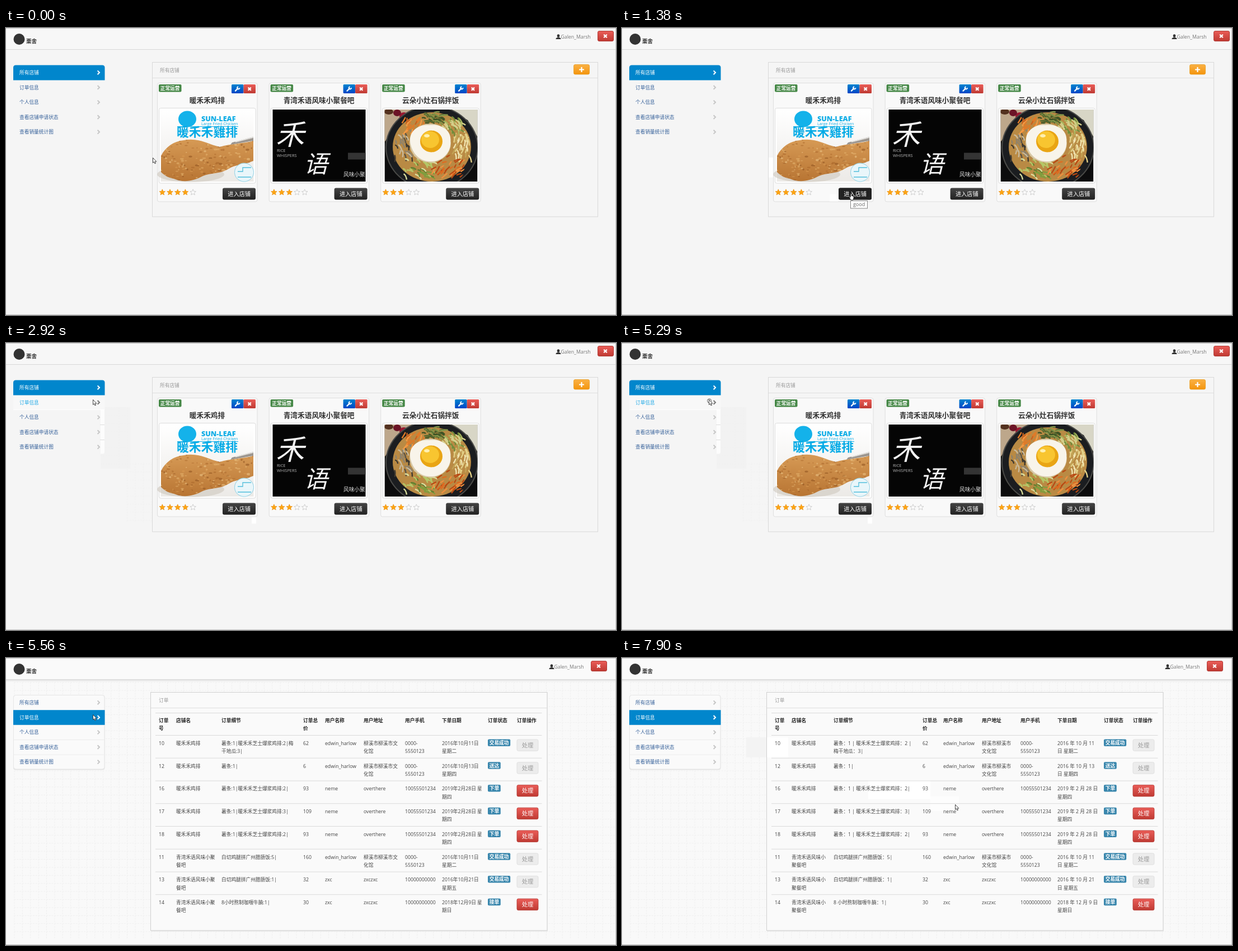
Animation of 1090x514 px, one loop 8000 ms. Source, as an HTML page:

```html
<!DOCTYPE html>
<html lang="zh-CN">
<head>
<meta charset="utf-8">
<title>店铺管理</title>
<style>
html, body { margin: 0; width: 100%; height: 100%; overflow: hidden; background: #f5f5f5; }
svg { display: block; width: 100%; height: 100%; }
text { font-family: "Open Sans", "Noto Sans CJK SC", "Noto Sans CJK", "Noto Sans CJK JP", sans-serif; font-size: 8.7px; white-space: pre; }
</style>
</head>
<body>
<svg id="stage" viewBox="0 0 1090 514" preserveAspectRatio="none"></svg>
<script>
const stage = document.getElementById('stage');
let seed = 7;
const rnd = () => (seed = seed * 16807 % 2147483647) / 2147483647;
const times = (n, f) => Array.from({ length: n }, (_, i) => f(i)).join('');

// Drawing helpers
const rect = (x, y, w, h, fill, more = '') =>
  `<rect x="${x}" y="${y}" width="${w}" height="${h}" fill="${fill}" ${more}/>`;
const text = (x, y, s, fill, more = '') => `<text x="${x}" y="${y}" fill="${fill}" ${more}>${s}</text>`;
const path = (d, fill, more = '') => `<path d="${d}" fill="${fill}" ${more}/>`;
const line = (x1, y1, x2, y2, c, w = 1) =>
  `<path d="M${x1} ${y1}L${x2} ${y2}" stroke="${c}" stroke-width="${w}" fill="none"/>`;
const ellipse = (x, y, rx, ry, fill, more = '') =>
  `<ellipse cx="${x}" cy="${y}" rx="${rx}" ry="${ry}" fill="${fill}" ${more}/>`;
const group = (body, more = '') => `<g ${more}>${body}</g>`;
const at = (x, y, body) => group(body, `transform="translate(${x} ${y})"`);
const show = (from, to, body) => group(body, `data-from="${from}" data-to="${to}"`);
const grad = (id, a, b) => `<linearGradient id="${id}" x2="0" y2="1"><stop stop-color="${a}"/><stop offset="1" stop-color="${b}"/></linearGradient>`;
const bold = 'font-weight="700"';
const mid = 'text-anchor="middle"';

const cross = (x, y, r = 2.8) =>
  path(`M${x - r} ${y - r}l${2 * r} ${2 * r}m0 ${-2 * r}l${-2 * r} ${2 * r}`, 'none', 'stroke="#fff" stroke-width="2.3"');
const chevron = (y, c) => path(`M163.6 ${y - 3.4}l3.4 3.4l-3.4 3.4`, 'none', `stroke="${c}" stroke-width="2"`);
const wrench = (x, y) => at(x, y, path('M-3.6 3.6L1 -1', 'none', 'stroke="#fff" stroke-width="2.2" stroke-linecap="round"') +
  path('M4 -2A2.3 2.3 0 1 1 1.6 -4', 'none', 'stroke="#fff" stroke-width="1.7"'));

function star(x, y, on) {
  const pts = Array.from({ length: 10 }, (_, i) => {
    const r = i % 2 ? 2.5 : 5.6, a = i * Math.PI / 5;
    return `${(x + r * Math.sin(a)).toFixed(1)},${(y + .4 - r * Math.cos(a)).toFixed(1)}`;
  });
  return `<polygon points="${pts.join(' ')}" fill="${on ? '#fda50f' : '#fafafa'}" stroke="${on ? '#e98f17' : '#bdbdbd'}" stroke-width=".7"/>`;
}

// Shared chrome
function header(shift, bg) {
  return rect(0, 0, 1090, 38, bg) + line(0, 38.5, 1090, 38.5, '#d8d8d8') +
    ellipse(23.5, 20, 10, 10, '#333') + text(36, 27, '栗舍', '#333', 'font-weight="900" style="font-size:9.6px"') +
    at(shift, 0, ellipse(987, 14, 2.3, 2.8, '#333') + path('M982.5 20c0-2.2 1.5-2.5 3.4-3.2h2.2c1.9.7 3.4 1 3.4 3.2z', '#333') +
      text(991.5, 19, 'Galen_Marsh', '#777') +
      rect(1057.5, 5.5, 28, 18, 'url(#red)', 'rx="2.5" stroke="#b23a35"') + cross(1071, 14.5));
}

const menu = ['所有店铺', '订单信息', '个人信息', '查看店铺申请状态', '查看销量统计图'];
const sideItem = (i, on) => {
  const y = 79.8 + i * 26.6;
  return text(24, y + 3.2, menu[i], on ? '#fff' : '#36619a') + chevron(y, on ? '#fff' : '#c6c6c6');
};

// Shop pictures
function chicken() {
  const blob = 'M277 229C285 213 299 203 318 201C345 196 362 209 382 213C400 207 425 207 442 202V238C424 246 410 244 398 252C382 262 366 259 352 265C334 275 316 277 300 270C288 268 281 262 277 258Z';
  const crumbs = times(240, () => {
    const c = ['#e6b56f', '#a9672a', '#d99a50', '#8f531f', '#efc88a'][rnd() * 5 | 0];
    return ellipse((277 + rnd() * 165).toFixed(1), (200 + rnd() * 75).toFixed(1), (1 + rnd() * 2.4).toFixed(1), (.6 + rnd() * 1.4).toFixed(1), c, 'opacity=".55"');
  });
  return rect(276.5, 146, 166, 129, 'url(#plate)') +
    ellipse(330, 262, 60, 14, '#cfc8be', 'opacity=".6"') +
    path(blob, 'url(#crust)') + group(crumbs, 'clip-path="url(#cutlet)"') +
    `<clipPath id="cutlet"><path d="${blob}"/></clipPath>` +
    path('M442 195L404 205L401 209L442 202Z', '#9c9690') + line(410, 204, 442, 196, '#e8e6e2', 1.5) +
    ellipse(324, 163, 16, 14.5, '#14b2ea') +
    text(349, 167, 'SUN-LEAF', '#12aee6', 'font-weight="800" style="font-size:12.6px"') +
    text(349, 173.5, 'Large Fried Chicken', '#12aee6', 'style="font-size:7.2px"') +
    line(306, 176.5, 415, 176.5, '#12aee6', 1) +
    text(305, 193.5, '暖禾禾雞排', '#05abe6', 'font-weight="900" style="font-size:21.8px"') +
    ellipse(425.5, 258.5, 17, 16.5, '#e9f6fa', 'stroke="#8fd0e4"') +
    path('M414 257h9v-7h15M414 267h24', 'none', 'stroke="#52bedb" stroke-width="1.3"');
}

function brushSign() {
  const brush = 'font-weight="500" font-style="italic"';
  return rect(476.5, 146, 166, 129, '#050505') +
    text(482, 209, '禾', '#f4f4f4', `${brush} style="font-size:51px"`) +
    text(532, 259, '语', '#f4f4f4', `${brush} style="font-size:43px"`) +
    text(484, 222, 'RICE', '#b5b5b5', 'style="font-size:7.4px"') +
    text(484, 230.5, 'WHISPERS', '#b5b5b5', 'style="font-size:7.4px"') +
    rect(611, 223.5, 31.5, 12, '#343434') +
    text(603, 265.5, '风味小聚', '#ddd', 'style="font-size:9.7px"');
}

function riceBowl() {
  const heap = (x, y, sx, sy, ang, cols) => times(34, () => {
    const px = x + (rnd() - .5) * sx, py = y + (rnd() - .5) * sy, a = ang + (rnd() - .5) * 1.1, l = 6 + rnd() * 9;
    return path(`M${px.toFixed(1)} ${py.toFixed(1)}q${(l * .4 * Math.cos(a) + 2).toFixed(1)} ${(l * .4 * Math.sin(a) - 2).toFixed(1)} ${(l * Math.cos(a)).toFixed(1)} ${(l * Math.sin(a)).toFixed(1)}`,
      'none', `stroke="${cols[rnd() * cols.length | 0]}" stroke-width="2.4"`);
  });
  return group(rect(676.5, 146, 166, 129, '#0c0c0d') +
    path('M676 146H735L700 170L676 205Z', '#bda78b') + path('M790 146H843V196L825 165Z', '#d8d6c6') +
    ellipse(711, 158, 8, 7, '#9c1730') + ellipse(699, 152, 7, 6, '#6c1426') + ellipse(684, 150, 8, 5, '#53311f') +
    ellipse(761, 214, 82, 74, '#1b1d20', 'stroke="#4a4a47" stroke-width="2"') +
    ellipse(761, 213, 70, 62, '#b98a44') +
    heap(712, 205, 36, 48, 1.2, ['#5d5445', '#8e826c', '#c9b99a', '#403a30']) +
    heap(730, 172, 34, 28, 2.2, ['#e07a28', '#c9601d', '#f09a45']) +
    heap(762, 160, 38, 20, .2, ['#56692f', '#3e5224', '#819348']) +
    heap(797, 172, 36, 28, .8, ['#a9b85f', '#6f8b3a', '#d4cf8a']) +
    heap(814, 208, 28, 42, 1.7, ['#e2cf86', '#c2a355', '#f0e3b0']) +
    heap(735, 250, 54, 34, .6, ['#b4c767', '#809d3d', '#d9dd9d', '#637f30']) +
    heap(793, 246, 54, 36, 2.4, ['#df6b20', '#b94a14', '#f08f3f']) +
    ellipse(758, 206, 37, 35, '#d8c9a6') +
    path('M722 202C721 184 738 172 756 174C778 171 797 184 794 203C796 222 780 239 760 239C738 240 724 222 722 202Z', '#f8f4ea') +
    ellipse(760, 203, 20, 19.5, '#e9a514') + ellipse(758, 200, 16, 15, '#f8c530') +
    ellipse(752, 193, 5, 3, '#fff0b0'), 'clip-path="url(#photo)"');
}

// Shop list page
function card(i, name, stars) {
  return at(i * 199.6, 0,
    rect(270.5, 98.5, 178.5, 212.5, '#f9f9f9', 'rx="3" stroke="#dedede"') +
    rect(273, 101, 40.5, 13.5, '#468847', 'rx="2"') + text(275.7, 111, '正常运营', '#fff', bold) +
    rect(403, 101, 21.5, 16, 'url(#blue)', 'rx="1.5"') + rect(424.5, 101, 21.5, 16, 'url(#red)', 'rx="1.5"') +
    wrench(413.5, 109) + cross(435.2, 109.2, 2.6) +
    text(359.5, 133.6, name, '#333', `${bold} ${mid} style="font-size:12.7px"`) +
    rect(273.5, 143.5, 172.5, 134.5, '#fff', 'rx="3" stroke="#dcdcdc"') +
    times(5, k => star(279.3 + k * 13.7, 294, k < stars)) +
    rect(387, 286.5, 59, 21, 'url(#dark)', 'rx="3"') +
    text(416.7, 300.8, '进入店铺', '#fff', `${mid} style="font-size:10.2px"`));
}

const shops = ['暖禾禾鸡排', '青湾禾语风味小聚餐吧', '云朵小灶石锅拌饭'];

const shopPage = rect(0, 0, 1090, 514, '#f5f5f5') + header(0, '#f7f7f7') +
  show(2460, 5560, rect(215, 213, 46, 109, 'url(#grid)', 'opacity=".7"')) +
  show(2610, 5560, rect(169, 115, 53, 110, '#f2f2f2') + rect(169, 115, 53, 110, 'url(#grid)', 'opacity=".6"') +
    path('M169 115H176V195Q176 198.5 172.5 198.5H169Z', '#fcfcfc') + line(168, 146.5, 176, 146.5, '#ddd') + line(168, 173.5, 176, 173.5, '#ddd')) +
  path('M13 93.5V71Q13 66.5 17.5 66.5H172Q176.500 66.500 176.500 71V93.500Z', '#0186cc') +
  show(2770, 5560, rect(13, 94, 163.5, 26, '#f8f8f8') + line(13, 119.5, 176, 119.5, '#fff')) +
  times(5, i => i === 1 ? '' : sideItem(i, i === 0)) +
  show(0, 2770, sideItem(1)) +
  show(2770, 5560, text(24, 109.6, menu[1], '#20a9e6') + chevron(106.4, '#777')) +
  rect(261.5, 61.5, 796, 276.5, 'none', 'stroke="#d9d9d9"') + line(262, 89.5, 1057, 89.5, '#dedede') +
  text(275, 78.6, '所有店铺', '#999') +
  rect(1014.5, 65.5, 28, 17.5, 'url(#orange)', 'rx="2.5" stroke="#e9960f" stroke-width=".7"') +
  path('M1024 74.500h9m-4.500-4.500v9', 'none', 'stroke="#fff" stroke-width="2.200"') +
  show(150, 2460, rect(262, 232, 8, 35.5, '#fff')) +
  times(3, i => card(i, shops[i], i ? 3 : 4)) +
  chicken() + brushSign() + riceBowl() +
  show(870, 2060, rect(371, 297.5, 15, 13, '#fdfdfd')) +
  show(1020, 2060, rect(387, 286.5, 59, 21, '#222', 'rx="3"') +
    text(416.7, 300.8, '进入店铺', '#fff', `${mid} style="font-size:10.2px"`)) +
  show(2060, 5560, rect(439, 312, 8, 11.5, '#fff')) +
  show(1380, 2460, rect(408.5, 309.5, 30, 13.5, '#fff', 'stroke="#858585"') +
    text(423.6, 319.4, 'good', '#666', `${mid} style="font-size:9px"`));

// Orders page: "~" breaks the tight layout, "^" the loose one, "/" both
const heads = ['订单/号', '店铺名', '订单细节', '订单总/价', '用户名称', '用户地址', '用户手机', '下单日期', '订单状态', '订单操作'];
const names = ['暖禾禾鸡排', '青湾禾语风味小^聚~餐吧'];
const snack = n => `薯条:1|暖禾禾芝士爆浆鸡排:${n}|`;
const users = {
  a: ['edwin_harlow', '柳溪市柳溪市^文~化馆', '0000-/5550123'],
  b: ['neme', 'overthere', '10055501234'],
  c: ['zxc', 'zxczxc', '10000000000']
};
const feb = '2019年2月28日 ^星~期四';
const orders = [
  [10, 0, snack(2) + '^梅~干地瓜:3|', 62, 'a', '2016年10月11^日 ~星期二', '交易成功'],
  [12, 0, '薯条:1|', 6, 'a', '2016年10月13^日 ~星期四', '送达'],
  [16, 0, snack(2), 93, 'b', feb, '下单'],
  [17, 0, snack(3), 109, 'b', feb, '下单'],
  [18, 0, snack(2), 93, 'b', feb, '下单'],
  [11, 1, '白切鸡腿拼广州腊肠饭:5|', 160, 'a', '2016年10月11^日 ~星期二', '交易成功'],
  [13, 1, '白切鸡腿拼广州腊肠饭:1|', 32, 'c', '2016年10月21^日 ~星期五', '交易成功'],
  [14, 1, '8小时熬制咖喱牛腩:1|', 30, 'c', '2018年12月9日 ^星~期日', '接单']
];
const columns = [
  [273, 304, 385, 531, 570, 639, 713, 779, 861, 913],
  [273, 303, 378, 537, 574, 643, 712, 778, 861, 913]
];
const rowTop = i => 138.5 + i * 40.75;

function cell(x, y, raw, loose, more = '') {
  let s = String(raw);
  if (loose) s = s.replace(/:/g, '：').replace(/\|(?=.)/g, ' | ').replace(/\d(?=[年月日小])|[年月](?=\d)/g, '$& ');
  const lines = s.replace(loose ? /~/g : /\^/g, '').split(/[\/~^]/);
  return lines.map((l, k) => text(x, y + 3.2 + k * 14.2, l, more ? '#222' : '#444', more)).join('');
}

function table(loose) {
  const col = columns[loose];
  return heads.map((h, i) => cell(col[i], 111.7, h, 0, bold)).join('') +
    orders.map(([id, shop, food, sum, who, date], i) =>
      [id, names[shop], food, sum, ...users[who], date].map((v, k) => cell(col[k], rowTop(i) + 14.2, v, loose)).join('')).join('');
}

function actions([, , , , , , state], i) {
  const y = rowTop(i), live = state === '下单' || state === '接单', w = state.length * 8.7 + 5.4;
  return rect(861, y + 7, w, 12.5, '#3a87ad', 'rx="2"') + text(863.7, y + 16.4, state, '#fff', bold) +
    rect(913, y + 7.4, 38, 20.5, live ? 'url(#red)' : '#ececec', `rx="2.5" stroke="${live ? '#b33630' : '#dcdcdc'}" stroke-width=".8"`) +
    text(932, y + 21.4, '处理', live ? '#fff' : '#999', `${mid} style="font-size:10.3px"`);
}

const orderPage = rect(0, 0, 1090, 514, '#f9f9f9') + rect(13, 39, 1076, 463, 'url(#grid)') +
  rect(0, 39, 1090, 4, 'url(#shade)') + header(-12, '#fafafa') +
  rect(13, 66.5, 163.5, 134, '#e4e4e4', 'rx="4"') + rect(13.5, 66.5, 162.5, 132.5, '#fafafa', 'rx="4" stroke="#e6e6e6"') +
  times(3, i => line(14, 120 + i * 26.6, 176, 120 + i * 26.6, '#ececec')) +
  rect(13, 93.2, 163.5, 26.6, '#0186cc') + times(5, i => sideItem(i, i === 1)) +
  rect(259, 62, 709, 428, '#ececec') +
  rect(258.5, 61.5, 708.5, 426.5, '#fafafa', 'stroke="#d0d0d0"') + line(259, 89.5, 967, 89.5, '#dedede') +
  text(273, 78.6, '订单', '#999') +
  show(6220, 8000, rect(222, 142, 36, 36, '#f3f3f3') + rect(259, 142, 38, 36, '#fff')) +
  show(7070, 8000, rect(440, 219, 111, 34, '#fff')) +
  show(7900, 8000, rect(551, 248, 51, 26, '#fdfdfd')) +
  times(9, i => { const y = i ? rowTop(i - 1) : 98.5; return line(267, y, 957.5, y, '#dadada'); }) +
  show(5560, 6090, table(0)) + show(6090, 8000, table(1)) + orders.map(actions).join('');

stage.innerHTML = `<defs>${grad('red', '#ea5d58', '#bf3a33')}${grad('blue', '#0084cf', '#0045c6')}${grad('orange', '#fab145', '#f4950d')}
  ${grad('dark', '#444', '#222')}${grad('plate', '#fff', '#eceae7')}${grad('crust', '#d69a55', '#b87533')}${grad('shade', '#e2e2e2', '#f9f9f9')}
  <clipPath id="photo"><rect x="676.5" y="146" width="166" height="129"/></clipPath>
  <pattern id="grid" width="14.4" height="14.4" patternUnits="userSpaceOnUse">
    <path d="M.5 0V14.4M0 .5H14.4" stroke="#efefef" stroke-dasharray="3 1.8" fill="none"/></pattern></defs>` +
  show(0, 5560, shopPage) + show(5560, 8000, orderPage) +
  line(0, .5, 1090, .5, '#c9c9c9') + line(1089.5, 0, 1089.5, 514, '#cfcfcf') + line(0, 513.5, 1090, 513.5, '#c4c4c4') +
  show(5290, 5560, '<circle id="ring" cx="156" cy="103.5" r="6" fill="none" stroke="#444" stroke-width=".9"/>') +
  group(path('M.5 .5V9.500L2.500 7.700L4 11L5.500 10.300L4.100 7.200H6.800Z', '#fff', 'id="arrow" stroke="#333" stroke-width=".9"') +
    path('M2.5 7V1.500Q2.500 .5 3.400 .5Q4.300 .5 4.300 1.500V4.500L7 5.100Q8 5.400 8 6.500V8.500L7 12H3L.6 8Q0 6.500 1.200 6.500Z', '#fff', 'id="hand" stroke="#222" stroke-width=".9"'), 'id="pointer"');

const stops = [
  [0, 262, 232], [150, 271, 256], [340, 300, 276], [480, 326, 286], [600, 350, 293], [720, 371, 297],
  [870, 391, 299], [1020, 400, 298], [1140, 404, 297], [1260, 406, 296], [2060, 372, 293], [2180, 305, 284],
  [2300, 238, 271], [2460, 215, 213], [2610, 168, 115], [2770, 162, 101], [2920, 155, 101], [6090, 222, 142],
  [6220, 290, 166], [6490, 343, 186], [6640, 410, 207], [6920, 440, 219], [7070, 543, 242], [7750, 551, 248], [7900, 595, 262]
];
const timed = [...stage.querySelectorAll('[data-from]')];
const [pointer, arrow, hand, ring] = ['pointer', 'arrow', 'hand', 'ring'].map(id => document.getElementById(id));
const toggle = (el, on) => el.setAttribute('display', on ? 'inline' : 'none');

function draw(t) {
  for (const el of timed) toggle(el, t >= +el.dataset.from && t < +el.dataset.to);
  const [, x, y] = stops.filter(s => s[0] <= t).pop();
  const pressing = t >= 1020 && t < 2060;
  pointer.setAttribute('transform', `translate(${x} ${y})`);
  toggle(arrow, !pressing);
  toggle(hand, pressing);
  ring.setAttribute('r', t < 5410 ? 3.5 : 6);
}

const start = performance.now();
function tick() {
  draw((performance.now() - start) % 8000);
  requestAnimationFrame(tick);
}
tick();
</script>
</body>
</html>
```
